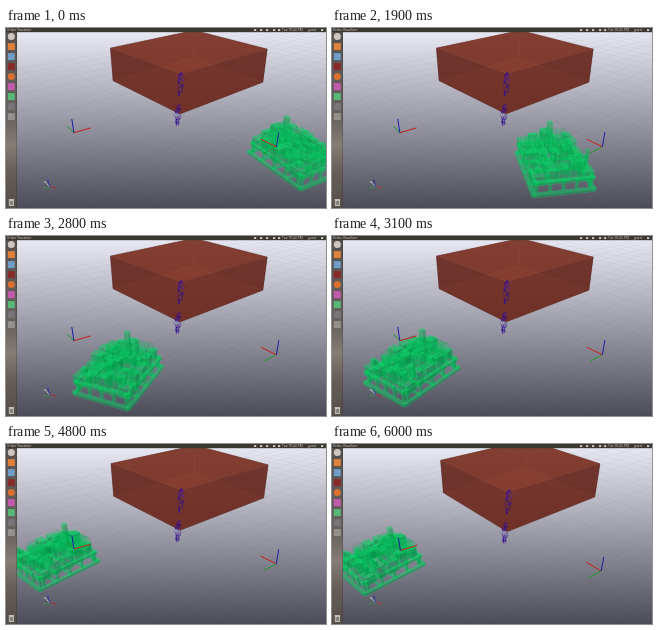
Write an HTML page with a canvas that moves like this. It is 320 by 180 pixels and loops after 6.1 s.

```html
<!DOCTYPE html>
<html lang="en">
<head>
<meta charset="utf-8">
<title>Drake Visualizer</title>
<style>
html, body { margin: 0; width: 100%; height: 100%; overflow: hidden; background: #4c4c59; }
canvas { display: block; width: 320px; height: 180px; }
</style>
</head>
<body>
<canvas id="view"></canvas>
<script>
const LOOP = 6100, STEP = 100;
const RAD = Math.PI / 180;
const FOCAL = 328, PIVOT_Y = 1.94;

const canvas = document.getElementById('view');
const ratio = window.devicePixelRatio || 1;
canvas.width = 320 * ratio;
canvas.height = 180 * ratio;
const ctx = canvas.getContext('2d');
ctx.scale(ratio, ratio);

// time, x, y, heading of the machine
const machinePath = [
  [0, .663, 1.501, 28], [1000, .663, 1.501, 28], [1300, .658, 1.5, 27],
  [2400, -.02, 1.366, -6], [3100, -.44, 1.446, -35],
  [4000, -.664, 1.633, -40], [6100, -.664, 1.633, -40]
];
// time, amount of orbit
const orbitPath = [[0, 0], [4300, 0], [4600, .1], [4700, .1], [5400, .35], [6000, 1], [6100, 1]];

function sample(path, t) {
  let i = 1;
  while (i < path.length - 1 && t > path[i][0]) i++;
  const a = path[i - 1], b = path[i];
  const k = (t - a[0]) / (b[0] - a[0]);
  return a.slice(1).map((v, j) => v + (b[j + 1] - v) * k);
}

function seeded(seed) {
  return () => {
    seed = (seed * 1664525 + 1013904223) >>> 0;
    return seed / 4294967296;
  };
}

// ---- camera ----
const cam = {};

function setCamera(orbit) {
  const pitch = (26.3 + 3.2 * orbit) * RAD, yaw = -2.5 * orbit * RAD;
  cam.sp = Math.sin(pitch);
  cam.cp = Math.cos(pitch);
  cam.sy = Math.sin(yaw);
  cam.cy = Math.cos(yaw);
  cam.lift = -.037 - .02 * orbit;
}

function toCam([x, y, z]) {
  const dy = y - PIVOT_Y;
  const rx = x * cam.cy - dy * cam.sy, ry = x * cam.sy + dy * cam.cy;
  return [rx, ry * cam.sp + z * cam.cp + cam.lift, ry * cam.cp - z * cam.sp + 2.18];
}

const toScreen = ([x, y, z]) => [165 + FOCAL * x / z, 92 - FOCAL * y / z];
const project = p => toScreen(toCam(p));

function trace(points, close) {
  ctx.beginPath();
  points.forEach(([x, y], i) => i ? ctx.lineTo(x, y) : ctx.moveTo(x, y));
  if (close) ctx.closePath();
}

function segment(a, b) {
  let p = toCam(a), q = toCam(b);
  const near = .4;
  if (p[2] < near && q[2] < near) return;
  if (p[2] < near) [p, q] = [q, p];
  if (q[2] < near) {
    const k = (p[2] - near) / (p[2] - q[2]);
    q = p.map((v, i) => v + (q[i] - v) * k);
  }
  trace([toScreen(p), toScreen(q)]);
  ctx.stroke();
}

// ---- ground ----
function drawGround() {
  const sky = ctx.createLinearGradient(0, 4, 0, 180);
  sky.addColorStop(0, '#e8e8f3');
  sky.addColorStop(1, '#4c4c59');
  ctx.fillStyle = sky;
  ctx.fillRect(0, 0, 320, 180);

  ctx.strokeStyle = 'rgba(40,40,60,.06)';
  ctx.lineWidth = .6;
  const c = Math.cos(39.5 * RAD), s = Math.sin(39.5 * RAD), gap = .178, far = 7;
  const at = (u, v) => [.036 + u * c - v * s, 2.158 + u * s + v * c, 0];
  for (let i = -38; i <= 38; i++) {
    segment(at(i * gap, -far), at(i * gap, 10 * gap));
    if (i <= 10) segment(at(-far, i * gap), at(far, i * gap));
  }
}

// ---- red box ----
const floor = [[-.526, 2.827], [.065, 2.12], [.825, 2.79], [.25, 3.6]];

function drawRoom() {
  const low = floor.map(p => project([...p, 0]));
  const top = floor.map(p => project([...p, .3]));
  const wall = (i, j) => [low[i], low[j], top[j], top[i]];
  const flat = 'rgba(124,42,24,.64)', side = 'rgba(98,31,20,.64)';
  const faces = [[low, flat], [wall(3, 0), side], [wall(2, 3), side],
    [wall(0, 1), side], [wall(1, 2), side], [top, flat]];
  for (const [points, color] of faces) {
    trace(points, true);
    ctx.fillStyle = color;
    ctx.fill();
  }
  ctx.lineWidth = .5;
  ctx.strokeStyle = 'rgba(55,18,12,.45)';
  trace([top[3], top[0], low[0], low[1], low[2], top[2]], true);
  ctx.stroke();
}

// ---- machine ----
const HALF_W = .15, HALF_L = .19;

function buildMachine() {
  const parts = [];
  const add = (x, y, z, w, d, h) => parts.push({ x, y, z, w, d, h });
  const rnd = seeded(41);
  for (const [z, scale] of [[0, 1], [.06, .95]]) {
    const w = HALF_W * scale, l = HALF_L * scale;
    for (const side of [-1, 1]) {
      add(side * w, 0, z, .018, l * 2, .014);
      add(0, side * l, z, w * 2, .018, .014);
    }
    for (let i = -1; i <= 1; i++) add(0, i * l * .5, z, w * 2, .01, .01);
  }
  for (let i = -2; i <= 2; i++) {
    for (const side of [-1, 1]) {
      add(side * .14, i * .08, .012, .012, .012, .06);
      add(i * .066, side * .175, .012, .012, .012, .06);
    }
  }
  for (let i = -2; i <= 2; i++) {
    for (let j = -2; j <= 2; j++) {
      add(i * .06, j * .07, .04 + rnd() * .04, .025 + rnd() * .045,
        .025 + rnd() * .05, .04 + rnd() * .05);
    }
  }
  for (let i = 0; i < 40; i++) {
    add((rnd() - .5) * .27, (rnd() - .5) * .33, .05 + rnd() * .08,
      .008 + rnd() * .03, .008 + rnd() * .04, .012 + rnd() * .04);
  }
  add(0, .09, .1, .024, .024, .14);
  return parts;
}

const machine = buildMachine();
// x, y, z, radius of tubes lying along x
const tubes = [[.05, .14, .125, .045], [-.06, .1, .12, .04], [.04, .03, .12, .03],
  [-.07, -.06, .115, .035], [.06, -.1, .11, .03]];
const SIDES = [[0, 1, 5, 4], [1, 2, 6, 5], [2, 3, 7, 6], [3, 0, 4, 7], [4, 5, 6, 7]];
const SHADES = ['10,168,84', '8,140,72', '8,150,76', '10,156,78', '18,202,104'];

function area(p) {
  return p.reduce((sum, a, i) => {
    const b = p[(i + 1) % p.length];
    return sum + a[0] * b[1] - b[0] * a[1];
  }, 0);
}

function drawMachine([mx, my, heading]) {
  const c = Math.cos(heading * RAD), s = Math.sin(heading * RAD);
  const place = (x, y, z) => [mx + x * c - y * s, my + x * s + y * c, z];
  const depth = p => toCam(place(p.x, p.y, p.z + p.h / 2))[2];
  const sorted = machine.map(p => [depth(p), p]).sort((a, b) => b[0] - a[0]);

  ctx.lineWidth = .4;
  ctx.strokeStyle = 'rgba(24,222,118,.42)';
  for (const [, p] of sorted) {
    const corners = [];
    for (const z of [p.z, p.z + p.h]) {
      for (const [i, j] of [[-1, -1], [1, -1], [1, 1], [-1, 1]]) {
        corners.push(project(place(p.x + i * p.w / 2, p.y + j * p.d / 2, z)));
      }
    }
    SIDES.forEach((side, n) => {
      const face = side.map(i => corners[i]);
      if (area(face) > 0) return;
      trace(face, true);
      ctx.fillStyle = `rgba(${SHADES[n]},.52)`;
      ctx.fill();
      ctx.stroke();
    });
  }

  ctx.lineWidth = .5;
  ctx.fillStyle = 'rgba(14,190,96,.14)';
  ctx.strokeStyle = 'rgba(0,120,60,.3)';
  for (const [x, y, z, r] of tubes) {
    for (let i = -4; i <= 4; i++) {
      const ring = [];
      for (let a = 0; a < 360; a += 24) {
        ring.push(project(place(x + i * .013, y + r * Math.cos(a * RAD), z + r * Math.sin(a * RAD))));
      }
      trace(ring, true);
      ctx.fill();
      if (i % 4 === 0) ctx.stroke();
    }
  }
}

// ---- axes ----
function drawAxes(x, y, angle) {
  const size = .113, o = [x, y, 0];
  const arm = a => [x + size * Math.cos(a * RAD), y + size * Math.sin(a * RAD), 0];
  ctx.lineWidth = 1;
  for (const [end, color] of [[arm(angle + 90), '#1d9a2a'], [arm(angle), '#c81c14'],
    [[x, y, .098], '#1a1fa4']]) {
    ctx.strokeStyle = color;
    segment(o, end);
  }
}

function drawMarker() {
  ctx.lineWidth = .8;
  for (const [x, y, color] of [[39, 154, '#c9cbd6'], [49, 160, '#b23430'],
    [38, 160, '#35904a'], [42, 152.5, '#2830a8']]) {
    ctx.strokeStyle = ctx.fillStyle = color;
    trace([[43.5, 158.5], [x, y]]);
    ctx.stroke();
    ctx.fillRect(x - .7, y - .7, 1.4, 1.4);
  }
}

// ---- purple scans ----
function drawScan(pos, height, seed) {
  const [x, y] = project(pos), rnd = seeded(seed);
  ctx.lineWidth = .8;
  for (let i = 0; i < 95; i++) {
    const k = rnd(), w = 1 + 2.4 * Math.sin(Math.PI * k);
    const px = x + (rnd() - .5) * w * 2 + (.5 - k) * 1.5, py = y + (k - .5) * height;
    ctx.strokeStyle = i % 5 ? 'rgba(50,12,138,.75)' : 'rgba(86,44,180,.7)';
    trace([[px, py], [px + (rnd() - .5) * 2.5, py + (rnd() - .4) * 4]]);
    ctx.stroke();
  }
}

// ---- desktop ----
const icons = ['#cfc8c2', '#e0803a', '#6f9cc8', '#8a2a28', '#d9702e', '#c45aae',
  '#58b978', '#77757a', '#94918f'];

function drawDesktop() {
  const strip = ctx.createLinearGradient(0, 4, 0, 180);
  [[0, '#56514e'], [.5, '#69635f'], [.64, '#857d76'], [.8, '#645d58'], [1, '#544e4a']]
    .forEach(([at, color]) => strip.addColorStop(at, color));
  ctx.fillStyle = strip;
  ctx.fillRect(0, 4, 11, 176);
  ctx.fillStyle = 'rgba(30,28,28,.5)';
  ctx.fillRect(10.6, 4, .4, 176);
  icons.forEach((color, i) => {
    ctx.fillStyle = color;
    ctx.beginPath();
    if (i === 0 || i === 4) ctx.arc(5.3, 8.6 + i * 10, 3.5, 0, 7);
    else ctx.rect(1.8, 5.1 + i * 10, 7, 7);
    ctx.fill();
  });
  ctx.fillStyle = '#c2beb9';
  ctx.fillRect(2.8, 171, 5.2, 7);
  ctx.fillStyle = '#88837e';
  ctx.fillRect(3.6, 173, 3.6, 4);

  ctx.fillStyle = '#3b3733';
  ctx.fillRect(0, 0, 320, 4.2);
  ctx.fillStyle = '#d6d0c7';
  ctx.font = '3.3px "Open Sans", "DejaVu Sans", sans-serif';
  ctx.textBaseline = 'middle';
  ctx.fillText('Drake Visualizer', 1, 2.2);
  ctx.fillText('Tue 10:42 PM', 276, 2.2);
  ctx.fillText('guest', 302, 2.2);
  for (const x of [248, 254, 260, 267, 272, 315]) ctx.fillRect(x, 1.2, 2.2, 1.8);
}

function draw(t) {
  setCamera(sample(orbitPath, t)[0]);
  drawGround();
  drawRoom();
  drawScan([.066, 2.22, .19], 23, 7);
  drawScan([.048, 2.107, 0], 21, 19);
  drawMarker();
  drawMachine(sample(machinePath, t));
  drawAxes(-.619, 1.84, 36);
  drawAxes(.622, 1.667, 128);
  drawDesktop();
}

let shown = -1;
const start = performance.now();

function tick() {
  const t = Math.floor(((performance.now() - start) % LOOP) / STEP) * STEP;
  if (t !== shown) draw(shown = t);
  requestAnimationFrame(tick);
}
tick();
</script>
</body>
</html>
```
